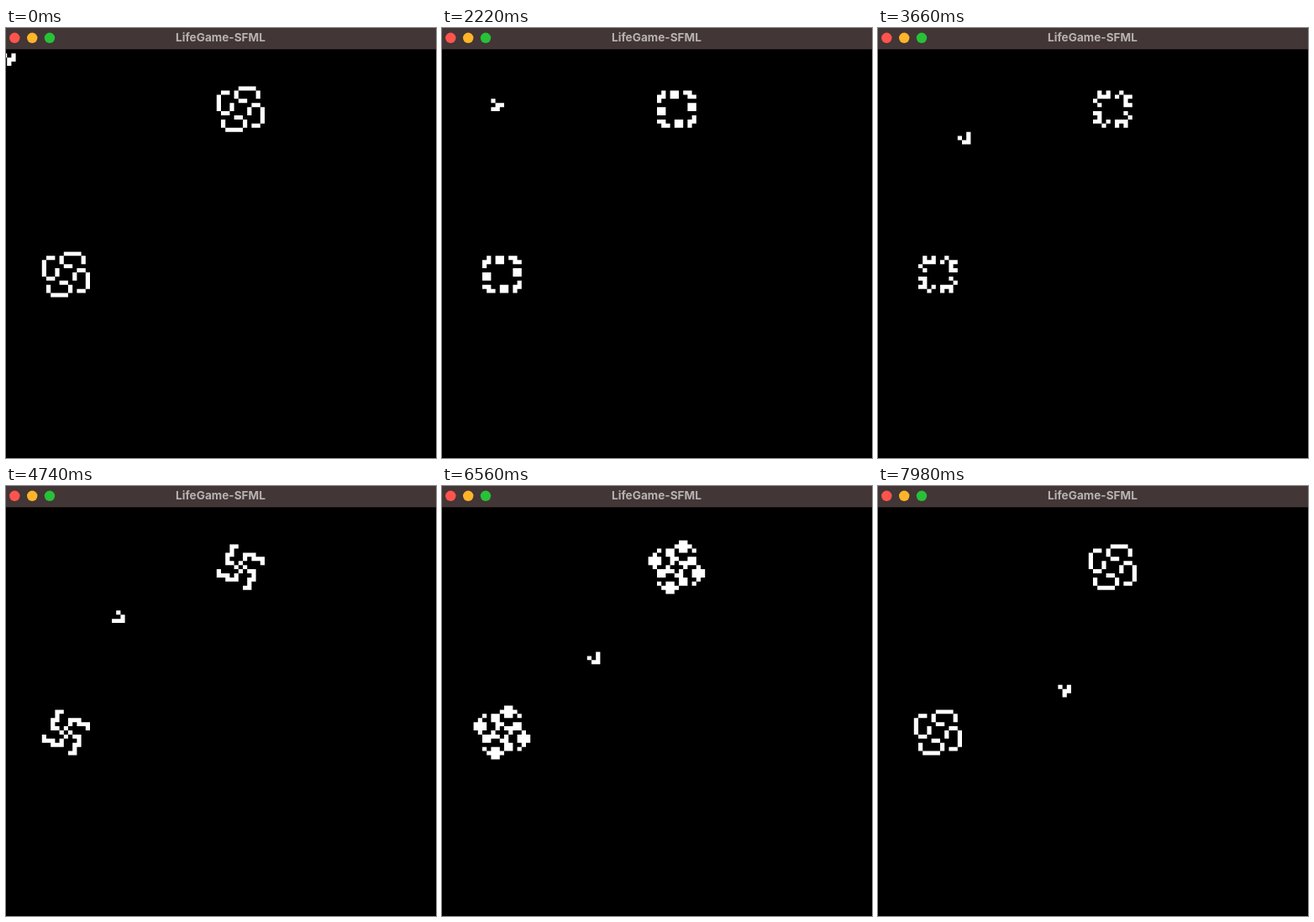
An HTML page with a canvas that plays this animation: 512x512 px, repeating every 8000 ms.

```html
<!DOCTYPE html>
<html lang="en">
<head>
<meta charset="utf-8">
<title>LifeGame-SFML</title>
<style>
  html, body { margin: 0; width: 100%; height: 100%; overflow: hidden; background: #000; }
  canvas, svg { position: absolute; left: 0; top: 0; display: block; }
  text { font: 700 13.6px Inter, Roboto, sans-serif; fill: #b8b3b2; text-anchor: middle; }
</style>
</head>
<body>
<canvas id="board" width="512" height="512"></canvas>
<svg width="512" height="26" viewBox="0 0 512 26">
  <rect width="512" height="25.3" fill="#423636"/>
  <circle cx="10.3" cy="11.8" r="6.2" fill="#ff544d"/>
  <circle cx="31.2" cy="11.8" r="6.2" fill="#ffb429"/>
  <circle cx="52" cy="11.8" r="6.2" fill="#28c138"/>
  <text x="255.5" y="16.1">LifeGame-SFML</text>
</svg>
<script>
const SIZE = 100, LOOP = 8000;
const CELL_W = 5.2, CELL_H = 4.92, LEFT = -4, TOP = 25.3;
const ctx = document.getElementById('board').getContext('2d');

const GLIDER = ['.X.', '..X', 'XXX'];
const GALAXY = [
  'XX.XXXXXX', 'XX.XXXXXX', 'XX.......',
  'XX.....XX', 'XX.....XX', 'XX.....XX',
  '.......XX', 'XXXXXX.XX', 'XXXXXX.XX'
];

const place = (pattern, row, col) => pattern.flatMap((line, r) =>
  [...line].flatMap((ch, c) => ch === 'X' ? [(row + r) * SIZE + col + c] : []));

// A generation is a list of live cell indices.
function evolve(live) {
  const alive = new Set(live), counts = new Map();
  for (const cell of live)
    for (const dr of [-SIZE, 0, SIZE])
      for (const dc of [-1, 0, 1])
        if (dr || dc) {
          const near = cell + dr + dc;
          counts.set(near, (counts.get(near) || 0) + 1);
        }
  return [...counts].filter(([cell, n]) => n === 3 || (n === 2 && alive.has(cell))).map(([cell]) => cell);
}

const start = [...place(GLIDER, 0, 0), ...place(GALAXY, 10, 50), ...place(GALAXY, 50, 10)];
const generations = [evolve(start)];
while (generations.length < 170) generations.push(evolve(generations.at(-1)));

// Ticks come in bursts of three (20, 20, 100 ms); every 49th tick repeats the board.
function generationAt(time) {
  const t = time + 20;
  const tick = 3 * Math.floor(t / 140) + Math.min(2, Math.floor(t % 140 / 20)) - 1;
  return tick - Math.floor((tick + 21) / 49);
}

let shown = -1;
function draw() {
  const index = generationAt(performance.now() % LOOP);
  if (index !== shown) {
    shown = index;
    ctx.fillStyle = '#000';
    ctx.fillRect(0, 0, 512, 512);
    ctx.fillStyle = '#fff';
    // One path for all cells, so that neighbours join without seams.
    ctx.beginPath();
    for (const cell of generations[index]) {
      const row = Math.floor(cell / SIZE), col = cell % SIZE;
      ctx.rect(LEFT + col * CELL_W, TOP + row * CELL_H, CELL_W, CELL_H);
    }
    ctx.fill();
  }
  requestAnimationFrame(draw);
}
draw();
</script>
</body>
</html>
```
